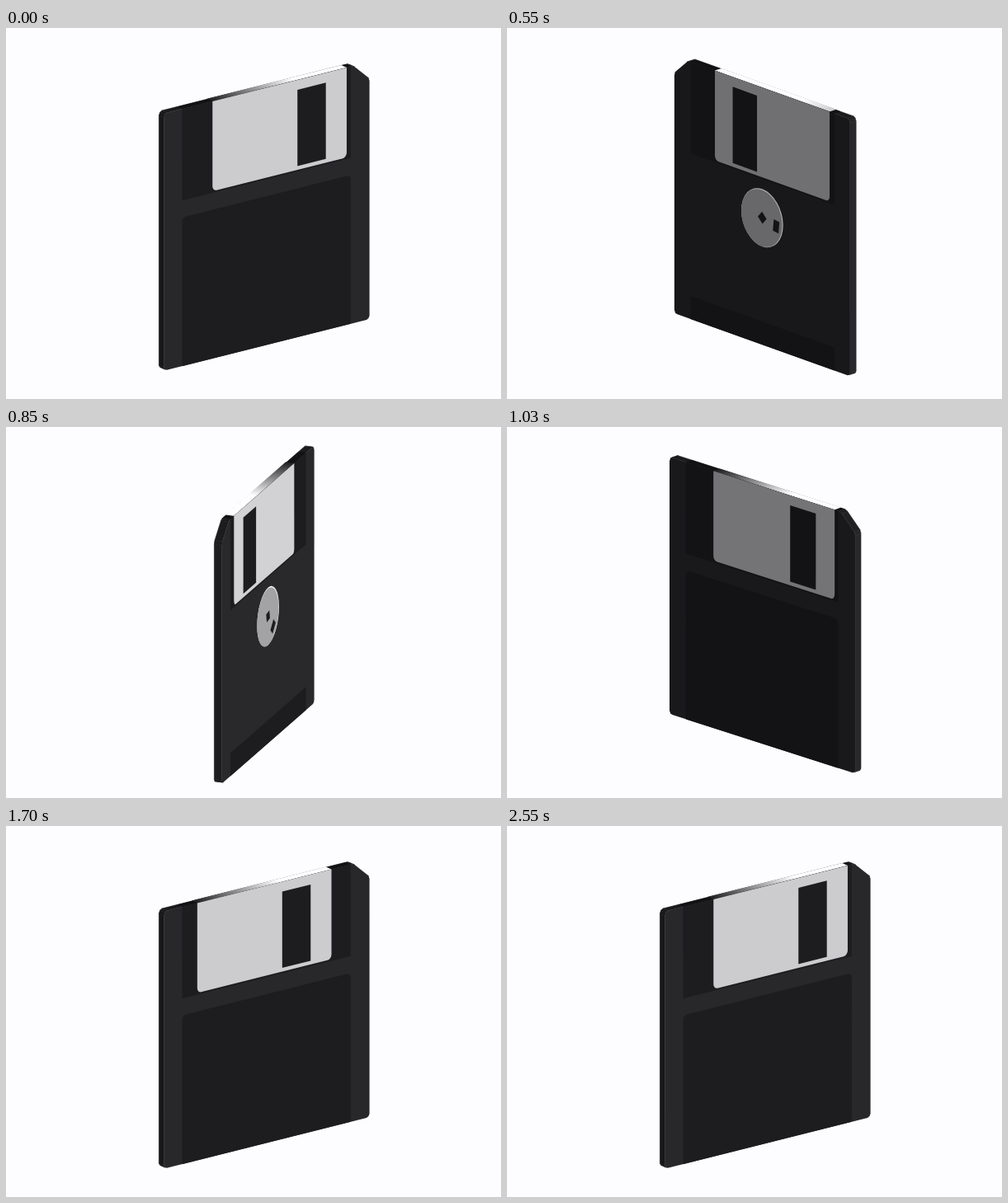
Write an HTML page with a canvas that moves like this. It is 600x450 px and loops after 2.58 s.

```html
<!DOCTYPE html>
<html>
<head>
<meta charset="utf-8">
<style>
html, body { margin: 0; width: 100%; height: 100%; overflow: hidden; background: #fdfcfe; }
canvas { display: block; }
</style>
</head>
<body>
<canvas id="stage" width="600" height="450"></canvas>
<script>
const ctx = document.getElementById('stage').getContext('2d');
const LOOP = 2580, CX = 313, CY = 227, TILT = 0.337, RISE = 0.942, HALF = 5, TOP = -156;
const rad = d => d * Math.PI / 180;
const clamp = p => Math.min(1, Math.max(0, p));
const gray = v => { v = Math.round(v); return `rgb(${v + 1},${v},${v + 3})`; };
const sineEase = p => (1 - Math.cos(Math.PI * p)) / 2;

// cubic-bezier(0.394, 0, 0.652, 1), solved for its parameter by bisection.
function spinEase(p) {
  let lo = 0, hi = 1;
  for (let i = 0; i < 24; i++) {
    const s = (lo + hi) / 2, r = 1 - s;
    if (3 * 0.394 * s * r * r + 3 * 0.652 * s * s * r + s ** 3 < p) lo = s; else hi = s;
  }
  return lo * lo * (3 - 2 * lo);
}

// Brightness of a surface turned to the given heading; the light stands right of the viewer.
const lit = (heading, base, gain) => base + gain * Math.cos(heading - rad(62));
const plastic = heading => lit(heading, 27.5, 13);
const recessed = heading => lit(heading, 20.5, 8);

// Disk outline, clockwise from the left edge: u across, v down.
const outline = [
  [-155.5, -151], [-154, -154.5], [-151, -156], [129, -156], [133, -154.5], [154, -137], [155.5, -133],
  [155.5, 152], [154, 154.8], [151, 156], [-151, 156], [-154, 154.8], [-155.5, 152]
];

function project(a, u, v, n) {
  return [CX + u * Math.cos(a) + n * Math.sin(a),
          CY + v + TILT * (n * Math.cos(a) - u * Math.sin(a))];
}

function polygon(points, color) {
  ctx.beginPath();
  points.forEach(p => ctx.lineTo(...p));
  ctx.closePath();
  ctx.fillStyle = color;
  ctx.fill();
}

function box(x, y, w, h, color, radii = 0) {
  ctx.beginPath();
  ctx.roundRect(x, y, w, h, radii);
  ctx.fillStyle = color;
  ctx.fill();
}

function disc(x, y, r, color) {
  ctx.beginPath();
  ctx.arc(x, y, r, 0, 2 * Math.PI);
  ctx.fillStyle = color;
  ctx.fill();
}

function drawSides(a) {
  outline.forEach(([u1, v1], i) => {
    const [u2, v2] = outline[(i + 1) % outline.length];
    const len = Math.hypot(u2 - u1, v2 - v1);
    const nu = (v2 - v1) / len, nv = (u1 - u2) / len;
    if (-nu * Math.sin(a) * RISE - nv * TILT <= 0) return;
    const heading = a + Math.sign(nu) * Math.PI / 2;
    const color = gray(nu * nu * plastic(heading) + nv * nv * 26);
    polygon([project(a, u1, v1, HALF), project(a, u2, v2, HALF),
             project(a, u2, v2, -HALF), project(a, u1, v1, -HALF)], color);
    ctx.strokeStyle = color;
    ctx.lineWidth = 0.6;
    ctx.stroke();
  });
}

function drawTop(a, slide) {
  const c = Math.cos(a), s = Math.sin(a), reach = HALF + 1.2;
  ctx.setTransform(c, -s * TILT, s, c * TILT, CX, CY + TOP);
  box(-128, -HALF, 255, 2 * HALF, gray(17));
  const glare = Math.max(0, Math.cos(a - rad(125))) ** 4;
  const shine = ctx.createLinearGradient(slide, 0, slide + 203, 0);
  shine.addColorStop(0, gray(30 + 180 * glare));
  shine.addColorStop(0.62 - 0.37 * glare, '#fdfcfe');
  box(slide, -reach, 203, 2 * reach, shine);
  ctx.resetTransform();
}

function drawHub(heading, t) {
  const metal = lit(heading, 117, 45), hole = gray(recessed(heading));
  ctx.save();
  ctx.translate(0, 2);
  ctx.scale(-1, RISE);
  disc(0, 0, 37, gray(metal + 75));
  disc(-0.9, 0.6, 36.3, gray(metal));
  ctx.rotate(rad(6 + (t - 550) * 0.125));
  box(20, -5.5, 10, 15, hole);
  ctx.rotate(rad(36));
  box(-5.5, -5.5, 11, 11, hole);
  ctx.restore();
}

function drawFace(a, slide, t) {
  const front = Math.cos(a) > 0, n = front ? HALF : -HALF;
  const heading = front ? a : a + Math.PI;
  const inset = gray(recessed(heading));
  polygon(outline.map(([u, v]) => project(a, u, v, n)), gray(plastic(heading)));
  ctx.setTransform(Math.cos(a), -Math.sin(a) * TILT, 0, 1, ...project(a, 0, 0, n));
  box(-128, TOP, 255, 111, inset);
  box(slide, TOP, 203, 109, gray(lit(heading, 135, 75)), [0, 0, 6, 6]);
  box(slide + 128.5, TOP + 12, 43, 92.5, inset);
  if (front) {
    box(-128, TOP + 131.5, 255, 180.5, inset, [6, 6, 0, 0]);
  } else {
    box(-128, TOP + 284, 255, 28, inset);
    drawHub(heading, t);
  }
  ctx.resetTransform();
}

function draw(t) {
  const a = rad(36.75 + 360 * spinEase(clamp((t - 32) / 1428)));
  // The shutter slides open and shut twice.
  const phase = clamp((t - (t < 1020 ? 93 : 1078)) / 873);
  const slide = -82 - 37.5 * sineEase(1 - Math.abs(1 - 2 * phase));
  ctx.fillStyle = '#fdfcfe';
  ctx.fillRect(0, 0, 600, 450);
  drawSides(a);
  drawTop(a, slide);
  drawFace(a, slide, t);
}

function tick() {
  draw(performance.now() % LOOP);
  requestAnimationFrame(tick);
}
tick();
</script>
</body>
</html>
```
